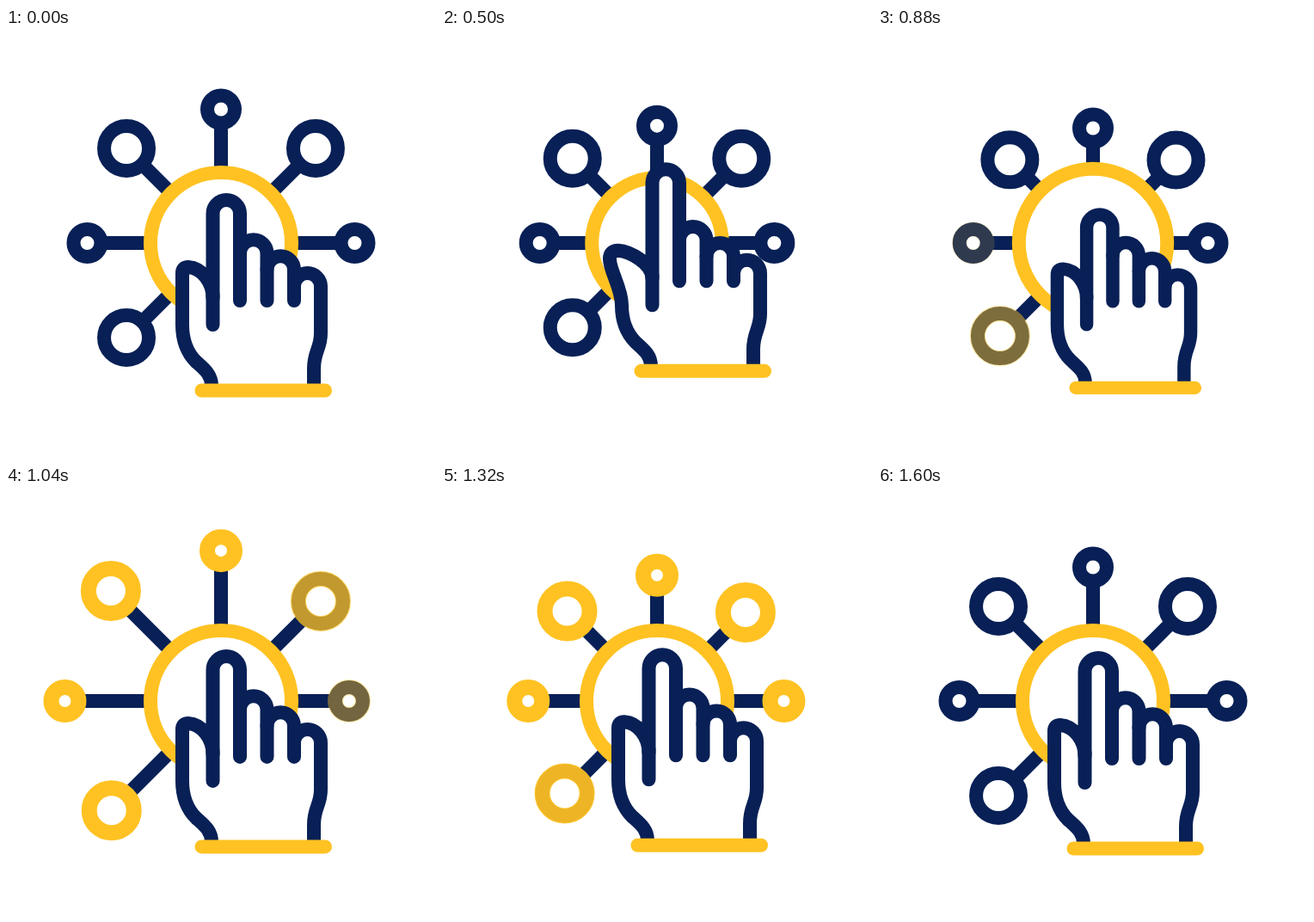
These frames come from a looping animation (500 by 500 pixels, 3 s). An HTML page:

```html
<!DOCTYPE html>
<html lang="en">
<head>
<meta charset="utf-8">
<title>Tap hub</title>
<style>
  html, body { margin: 0; width: 100%; height: 100%; overflow: hidden; background: #fff; }
  svg { display: block; width: 100%; height: 100%; }
  .navy { stroke: #082056; stroke-width: 16; }
  .gold { stroke: #ffc222; stroke-width: 16; }
  .glow { stroke-width: 18; fill: none; }
  #hand { stroke-linecap: round; stroke-linejoin: round; }
</style>
</head>
<body>
<svg viewBox="0 0 500 500" fill="#fff">
  <g id="nodes"></g>
  <circle id="hub" class="gold" cx="250" cy="250"/>
  <g id="hand">
    <path id="palm" class="navy"/>
    <path id="creases" class="navy" fill="none"/>
    <path class="gold" d="M227.5 421.5H371"/>
  </g>
</svg>
<script>
const LOOP = 3000, STAGGER = 33, REST = 155.5;
const $ = id => document.getElementById(id);

const ramp = (t, a, b) => Math.min(1, Math.max(0, (t - a) / (b - a)));
const smooth = (t, a, b) => (1 - Math.cos(Math.PI * ramp(t, a, b))) / 2;
const easeOut = (t, a, b, power) => 1 - (1 - ramp(t, a, b)) ** power;

// The hand lifts, presses down, then floats back to rest.
const lift = t => easeOut(t, 100, 580, 1.5) * (1 - smooth(t, 580, 800));
const press = t => smooth(t, 720, 865) - smooth(t, 865, 1040);
const float = t => smooth(t, 880, 1220) - smooth(t, 1220, 1600);

// Nodes draw in together, then shoot out, dip and settle one after another.
const pull = (t, depth) => depth * easeOut(t, 110, 720, 2);
const burst = (t, depth) => (depth + 26) * smooth(t, 808, 985)
  - 36 * smooth(t, 1020, 1180) + 10 * smooth(t, 1180, 1420);
const glow = t => ramp(t, 832, 935) - ramp(t, 1313, 1420);

// Clockwise from the lower left; the diagonal nodes are larger.
const nodes = Array.from({ length: 6 }, (_, i) => {
  const angle = 135 + 45 * i, diagonal = i % 2 === 0;
  const r = diagonal ? 26 : 16, depth = diagonal ? 19 : 22;
  const g = document.createElementNS("http://www.w3.org/2000/svg", "g");
  g.setAttribute("transform", `rotate(${angle} 250 250)`);
  g.innerHTML = `<path class="navy"/><circle class="navy" cy="250" r="${r}"/>` +
    `<circle class="gold glow" cy="250" r="${r}"/>`;
  $("nodes").append(g);
  const [stick, ring, light] = g.children;
  return t => {
    const local = t - i * STAGGER;
    const x = 250 + REST - pull(t, depth) + burst(local, depth);
    stick.setAttribute("d", `M250 250H${x}`);
    ring.setAttribute("cx", x);
    light.setAttribute("cx", x);
    light.setAttribute("opacity", glow(local));
  };
});

function drawHand(t) {
  const up = lift(t), down = press(t);
  const drop = 8 * up, tip = 215.75 - 14 * up + 12.7 * down;
  const x = 205 - 15 * up, y = 278 + 3.7 * up, c = 7 + 3 * up;
  const finger = (top, width) => `V${top}a${width / 2} ${width / 2} 0 0 1 ${width} 0`;
  const crease = (x, top, bottom) => `M${x} ${top}V${bottom}`;
  const middle = 262 + drop, third = 281 + drop, little = 300.5 + drop;

  $("palm").setAttribute("d",
    "M239 416C239 403 231 397 221 388C211 378 205 365 205 345" +
    `C205 325 ${x} ${y + 24} ${x} ${y + c}Q${x} ${y} ${x + c} ${y}` +
    `C${x + 23} ${y + 1} 240.5 296 240.5 314` +
    finger(tip, 31.5) + finger(middle, 31.5) + finger(third, 31.5) + finger(little, 31) +
    "V355C366 373 358 376 358 396V416");
  $("creases").setAttribute("d", crease(240.5, 310, 345) + crease(272, middle, 317) +
    crease(303.5, third, 317) + crease(335, little, 317));

  const s = 1 - 0.037 * down;
  const dx = 4.3 * up, dy = -24.3 * up - 4.5 * float(t);
  $("hand").setAttribute("transform",
    `translate(${299 + dx} ${336 + dy}) scale(${s}) translate(-299 -336)`);
}

function draw(t) {
  nodes.forEach(node => node(t));
  $("hub").setAttribute("r", 82 - 6.7 * lift(t) + 4.3 * press(t));
  drawHand(t);
}

const start = performance.now();
function tick() {
  draw((performance.now() - start) % LOOP);
  requestAnimationFrame(tick);
}
tick();
</script>
</body>
</html>
```
